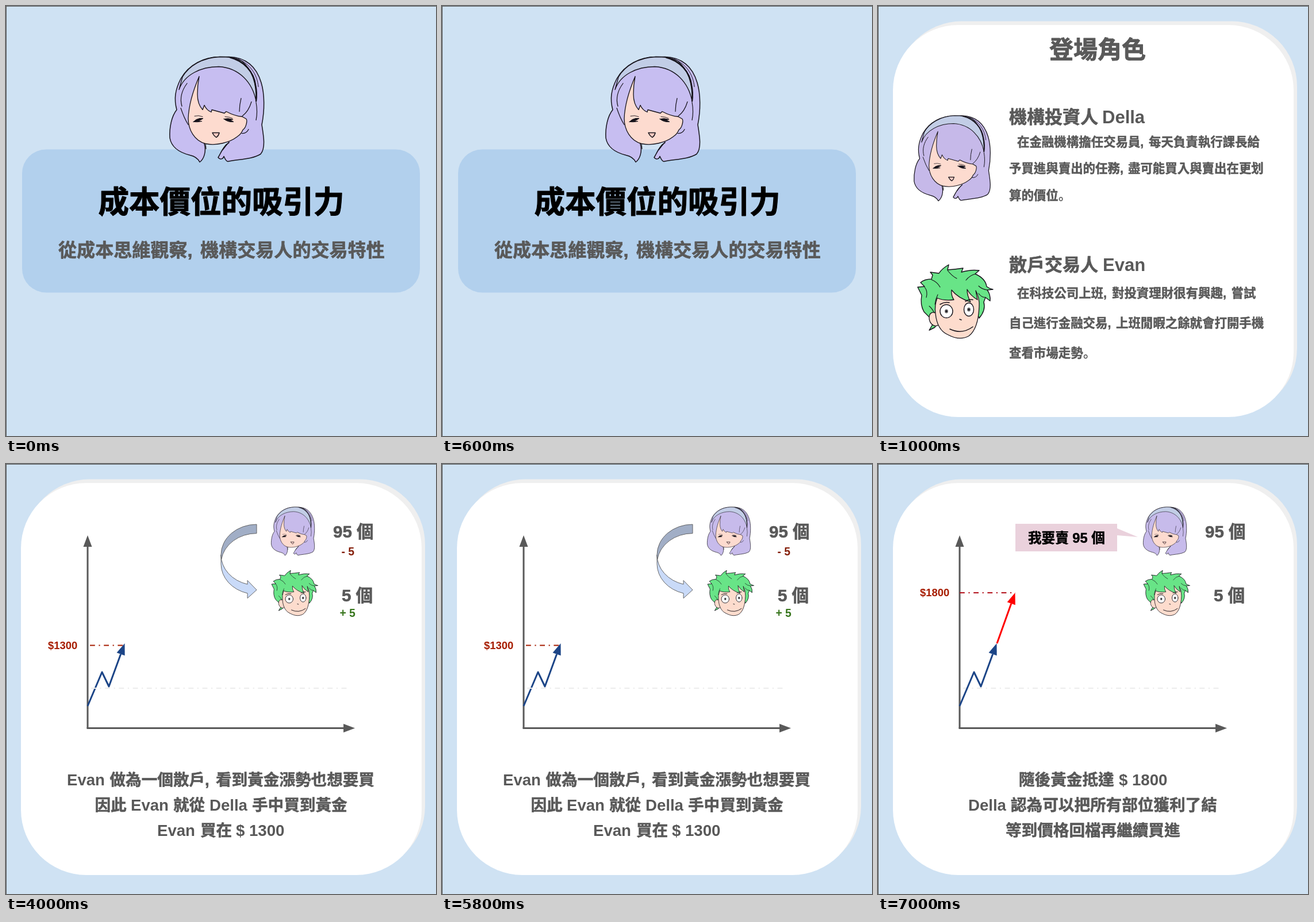
An HTML page with a canvas that plays this animation: 748 px wide and 748 px high, repeating every 8000 ms.

```html
<!DOCTYPE html>
<html lang="zh-Hant">
<head>
<meta charset="utf-8">
<title>成本價位的吸引力</title>
<style>
html, body { margin: 0; width: 100%; height: 100%; overflow: hidden; background: #cfe2f3; }
canvas { display: block; }
</style>
</head>
<body>
<canvas id="stage" width="748" height="748"></canvas>
<script>
const ctx = document.getElementById('stage').getContext('2d');
const LOOP = 8000;
const GREY = '#595959', INK = '#15121a', BLUE = '#1c4587', RUST = '#a61c00';
const TC = '"Liberation Sans", "Noto Sans CJK TC", "Noto Sans CJK", sans-serif';
const JP = '"Noto Sans CJK JP", "Noto Sans CJK", sans-serif';
const HAN = /[\u4e00-\u9fff]/;

// y is the middle of the line; Han text gets a little extra weight
function text(str, x, y, size, color = GREY, family = TC) {
  const base = y + size * 0.365;
  ctx.font = `bold ${size}px ${family}`;
  ctx.fillStyle = ctx.strokeStyle = color;
  ctx.fillText(str, x, base);
  if (HAN.test(str)) {
    ctx.lineWidth = size * 0.022;
    ctx.lineJoin = 'round';
    ctx.strokeText(str, x, base);
  }
}

// parts: x, string, x, string ...
function line(y, size, ...parts) {
  for (let i = 0; i < parts.length; i += 2) text(parts[i + 1], parts[i], y, size);
}

function box(x, y, w, h, r, color) {
  ctx.fillStyle = color;
  ctx.beginPath();
  ctx.roundRect(x, y, w, h, r);
  ctx.fill();
}

function shape(d, fill, stroke, width) {
  const p = new Path2D(d);
  if (fill) { ctx.fillStyle = fill; ctx.fill(p); }
  if (stroke) { ctx.strokeStyle = stroke; ctx.lineWidth = width; ctx.stroke(p); }
}

function sprite(draw, x, y, scale, ...args) {
  ctx.save();
  ctx.translate(x, y);
  ctx.scale(scale, scale);
  ctx.lineCap = ctx.lineJoin = 'round';
  draw(...args);
  ctx.restore();
}

function girl(hair) {
  shape('M88 1C61 1 34 14 20 39C10 59 8 74 13 93C4 104 0 124 1 142C4 160 20 168 36 172C45 174 50 178 53 184C60 179 65 166 61 152L104 150C94 156 90 168 85 176C89 181 94 178 95 174C97 178 98 182 102 183C122 179 145 179 159 170C168 160 164 138 161 119C166 94 166 66 160 46C152 19 134 2 104 1Z', hair);
  shape('M61 152C65 166 60 179 53 184C50 178 45 174 36 172C20 168 4 160 1 142C0 124 4 104 13 93C8 74 10 59 20 39C34 14 61 1 88 1L104 1C134 2 152 19 160 46C166 66 166 94 161 119C164 138 168 160 159 170C145 179 122 179 102 183C98 182 97 178 95 174C94 178 89 181 85 176C90 168 94 156 104 150', null, INK, 1.5);
  shape('M52 35C43 56 34 82 33 108C33 128 44 147 63 152C82 156 105 150 118 140C124 136 126 133 128 128C134 124 136 112 134 109L127 105Q114 104 99 96L96 99L74 93L73 97Q65 94 61 85L58 93Q49 83 49 66Q49 50 52 35Z', '#fddbcf', INK, 1.3);
  shape('M17 58C26 32 55 18 86 18C122 20 145 46 151 78C152 50 145 24 126 8C112 1 98 1 88 1C58 2 34 17 23 36Z', '#c2cde6', INK, 1.3);
  shape('M106 2C130 8 147 27 150 50Q153 64 151 78', null, INK, 2.4);
  shape('M120 5C140 13 153 31 155 53', null, INK, 1);
  shape('M31 47C22 59 18 73 22 87M20 90Q26 108 33 119M143 79Q138 96 127 104M125 73Q122 85 122 96M126 134Q134 135 138 127M63 152L64 161M104 149L93 163M151 80Q154 97 151 111', null, INK, 1.2);
  // closed eyes
  shape('M42 114L47 110Q53 107 59 108Q54 112 48 113L57 113Q48 115 42 114Z', INK, INK, 1);
  shape('M95 109Q103 107 111 110L106 111L112 114Q102 115 95 109Z', INK, INK, 1);
  shape('M44 104Q51 102 58 105M97 105Q104 105 110 108', null, INK, 0.9);
  shape('M75 133L87 133Q86 138 82 141Q78 139 75 133Z', '#f8cbc2', INK, 1.5);
}

function boy() {
  const skin = '#fddccd';
  shape('M21 92L11 82Q4 70 7 53L0 39L12 38L5 31Q12 25 24 25L26 18L22 13L37 15Q42 7 54 0L52 9Q66 8 79 6L76 13Q92 8 107 10L100 16Q118 24 120 38Q125 42 131 43L121 44Q127 52 126 63L118 57L115 65Q119 79 107 93L102 81L35 100L30 109L20 114L26 104Z', '#68e487', INK, 1.4);
  shape('M34 85C20 77 16 94 24 103Q30 109 36 105Z', skin, INK, 1.3);
  shape('M34 58Q29 71 31 85C33 106 41 117 53 122C66 129 78 130 89 124C101 115 106 97 107 73Q108 58 101 45L104 61Q92 54 86 43Q86 54 92 65Q70 58 59 44Q58 54 63 61Q45 63 34 58Z', skin, INK, 1.3);
  shape('M35 52Q31 60 30 69M12 39Q18 46 15 57M24 26Q34 30 39 39M101 16Q91 18 84 27M121 44Q112 43 106 37M20 72Q25 76 29 84M118 57Q111 57 106 50M52 10Q60 20 68 24', null, INK, 1.1);
  shape('M39 69Q47 64 55 66M83 64Q90 59 96 61', null, INK, 1.5);
  for (const [x, y, rx, ry] of [[50, 81, 11, 11.5], [89, 78, 8.5, 11.5]]) {
    ctx.beginPath();
    ctx.ellipse(x, y, rx, ry, 0, 0, 7);
    ctx.fillStyle = '#fff';
    ctx.fill();
    ctx.lineWidth = 1.4;
    ctx.stroke();
    ctx.beginPath();
    ctx.ellipse(x, y, 3, 3.6, 0, 0, 7);
    ctx.fillStyle = '#777';
    ctx.fill();
    ctx.beginPath();
    ctx.arc(x, y, 1.7, 0, 7);
    ctx.fillStyle = INK;
    ctx.fill();
  }
  shape('M56 112Q77 122 96 108M73 95L76 96', null, INK, 1.5);
}

// Polyline with a filled head at its last point
function arrow(color, ...pts) {
  const n = pts.length, x = pts[n - 2], y = pts[n - 1];
  const a = Math.atan2(y - pts[n - 3], x - pts[n - 4]);
  const c = Math.cos(a), s = Math.sin(a), bx = x - 20 * c, by = y - 20 * s;
  ctx.strokeStyle = ctx.fillStyle = color;
  ctx.lineWidth = 3;
  ctx.lineJoin = 'round';
  ctx.beginPath();
  for (let i = 0; i < n - 2; i += 2) ctx.lineTo(pts[i], pts[i + 1]);
  ctx.lineTo(bx, by);
  ctx.stroke();
  ctx.beginPath();
  ctx.moveTo(x, y);
  ctx.lineTo(bx - 7.5 * s, by + 7.5 * c);
  ctx.lineTo(bx + 7.5 * s, by - 7.5 * c);
  ctx.fill();
}

function dashDot(x1, x2, y, color) {
  ctx.save();
  ctx.setLineDash([8.8, 6.6, 2.2, 6.6]);
  ctx.strokeStyle = color;
  ctx.lineWidth = 2.2;
  ctx.beginPath();
  ctx.moveTo(x1, y);
  ctx.lineTo(x2, y);
  ctx.stroke();
  ctx.restore();
}

function curvedArrow() {
  const cx = 436, rx = 62, ry = 53, y1 = 158, y2 = 173.7, cut = 0.148;
  const end = Math.PI / 2 + 0.26;
  const finish = color => {
    ctx.closePath();
    ctx.fillStyle = color;
    ctx.fill();
    ctx.strokeStyle = GREY;
    ctx.lineWidth = 0.9;
    ctx.stroke();
  };
  ctx.beginPath();
  ctx.ellipse(cx, y1, rx, ry, 0, Math.PI, end, true);
  ctx.lineTo(420, 202.5);
  ctx.lineTo(436, 219);
  ctx.lineTo(420, 233.5);
  ctx.ellipse(cx, y2, rx, ry, 0, end, Math.PI);
  finish('#c9daf8');
  ctx.beginPath();
  ctx.ellipse(cx, y1, rx, ry, 0, Math.PI * 1.5, Math.PI - cut, true);
  ctx.ellipse(cx, y2, rx, ry, 0, Math.PI + cut, Math.PI * 1.5);
  finish('#a1aec6');
}

function card() {
  box(32, 26.5, 697, 682, 113.5, '#efefef');
  box(26, 33, 697, 682, 113.5, '#fff');
}

function cover() {
  box(28, 249.5, 692, 249, 41.5, '#b2d0ed');
  sprite(girl, 284, 87.5, 1, '#c7bef1');
  text('成本價位的吸引力', 160.5, 340, 53.5, '#000');
  line(424, 32.1, 91, '從成本思維觀察,', 338, '機構交易人的交易特性');
}

function cast() {
  card();
  line(76, 42, 298, '登場角色');
  sprite(girl, 62, 190, 0.81, '#c6b9e9');
  line(192.5, 31, 228, '機構投資人', 390, 'Della');
  const body = 21.45;
  line(236, body, 242, '在金融機構擔任交易員,', 471, '每天負責執行課長給');
  line(282.5, body, 228, '予買進與賣出的任務,', 435, '盡可能買入與賣出在更划');
  line(329, body, 228, '算的價位');
  text('。', 314, 329, body, GREY, JP);
  sprite(boy, 69, 450, 1);
  line(450, 31, 228, '散戶交易人', 391, 'Evan');
  line(499.5, body, 242, '在科技公司上班,', 407, '對投資理財很有興趣,', 614.5, '嘗試');
  line(551, body, 228, '自己進行金融交易,', 414, '上班閒暇之餘就會打開手機');
  line(603, body, 228, '查看市場走勢');
  text('。', 357, 603, body, GREY, JP);
}

function chart() {
  card();
  arrow(GREY, 142, 459.5, 142, 124);
  arrow(GREY, 140.5, 459.5, 607, 459.5);
  sprite(girl, 461, 74.5, 0.46, '#c7bbeb');
  sprite(boy, 462, 185, 0.615);
  line(117, 29.5, 569, '95 個');
  line(228, 29.5, 584, '5 個');
}

const trend = () => arrow(BLUE, 142, 421, 167, 362, 179, 387, 206.5, 312);
const support = () => dashDot(148, 593, 390, '#ececec');

function buy() {
  chart();
  dashDot(146, 206, 315.5, RUST);
  trend();
  support();
  curvedArrow();
  text('- 5', 583.5, 152, 19.3, '#85200c');
  text('+ 5', 580.5, 259, 19.3, '#38761d');
  text('$1300', 73, 315, 18.4, RUST);
  const size = 27.6;
  line(549, size, 106, 'Evan', 180.5, '做為一個散戶,', 365, '看到黃金漲勢也想要買');
  line(593, size, 154.5, '因此', 217, 'Evan', 291, '就從', 354, 'Della', 428, '手中買到黃金');
  line(637, size, 263, 'Evan', 338, '買在', 400, '$ 1300');
}

function sell() {
  chart();
  support();
  dashDot(142, 239, 224, '#b3121c');
  trend();
  arrow('#f00', 207, 312, 238.5, 224);
  text('$1800', 73, 223.5, 18.4, RUST);
  shape('M239 104H416V112L452 127L416 124V152H239Z', '#ead1dc');
  text('我要賣 95 個', 261, 128.5, 23.6, '#000');
  const size = 27.6;
  line(549, size, 245, '隨後黃金抵達', 419, '$ 1800');
  line(593, size, 157, 'Della', 231, '認為可以把所有部位獲利了結');
  line(637, size, 222, '等到價格回檔再繼續買進');
}

const scenes = [[0, cover], [1000, cast], [4000, buy], [7000, sell]];

function frame() {
  const t = performance.now() % LOOP;
  ctx.fillStyle = '#cfe2f3';
  ctx.fillRect(0, 0, 748, 748);
  scenes.filter(([start]) => t >= start).pop()[1]();
  ctx.fillStyle = GREY;
  ctx.fillRect(0, 0, 748, 1);
  ctx.fillRect(0, 0, 1, 748);
  requestAnimationFrame(frame);
}
frame();
</script>
</body>
</html>
```
